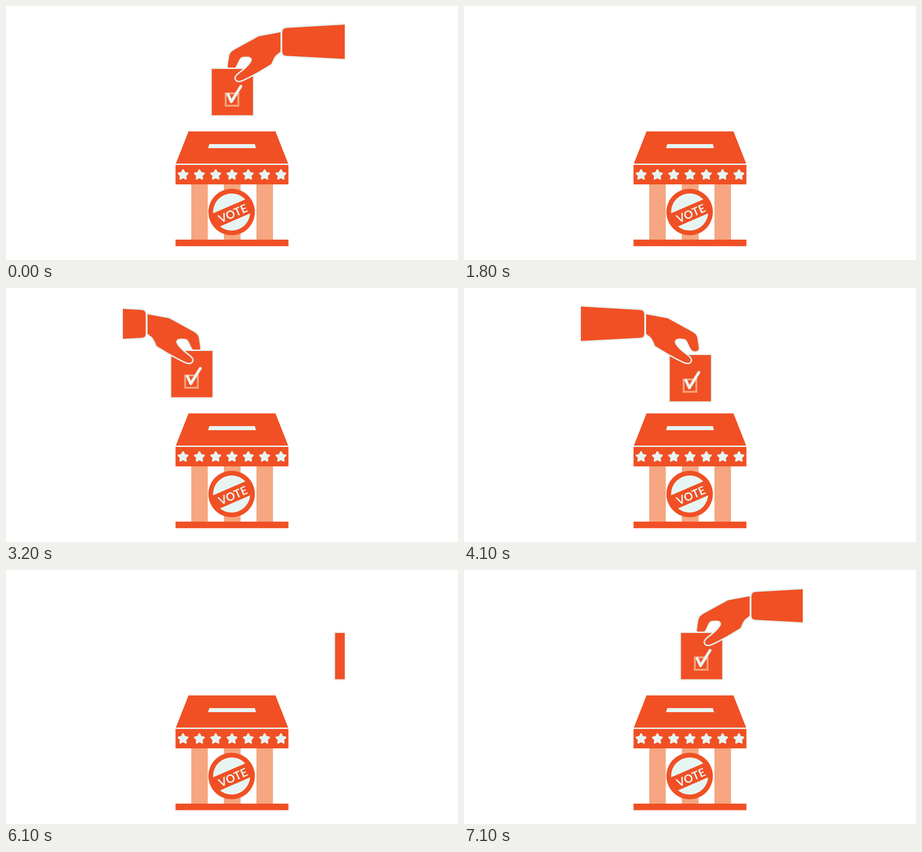
Recreate the animation shown at these times as an HTML page. Size 998 px wide and 561 px high, loop 7.2 s.

```html
<!DOCTYPE html>
<html lang="en">
<head>
<meta charset="utf-8">
<title>Ballot box</title>
<style>
  :root { --red: #f15025; --mint: #e7f5f2; --peach: #f6a680; }
  html, body { margin: 0; width: 100%; height: 100%; overflow: hidden; background: #fff; }
  svg { display: block; width: 100%; height: 100%; }

  .red { fill: var(--red); }
  .mint { fill: var(--mint); }
  .peach { fill: var(--peach); }
  .edged { stroke: #dd8c68; stroke-width: .6; }
  .outlined { fill: var(--red); stroke: var(--mint); stroke-width: 6; paint-order: stroke; }
  .round { stroke-linejoin: round; }
  .vote { font: 700 25px Lato, sans-serif; letter-spacing: .4px; text-anchor: middle; }

  /* Everything moves at ten steps a second; the tiny delay keeps steps on their marks. */
  .right, .left, .ballot { animation: 7.2s -1ms infinite step-end; }
  .right { animation-name: right; }
  .left { animation-name: left; }
  .ballot { animation-name: ballot; }

  @keyframes right {
    0% { transform: translateX(0); }
    6.9444% { transform: translateX(0); animation-timing-function: steps(13); }
    25% { transform: translateX(283.4px); }
    83.3333% { transform: translateX(297px); animation-timing-function: steps(12); }
    100% { transform: translateX(0); }
  }
  @keyframes left {
    0% { transform: translateX(-291px); }
    31.9444% { transform: translateX(-291px); animation-timing-function: steps(13); }
    50% { transform: translateX(0); }
    56.9444% { transform: translateX(0); animation-timing-function: steps(13); }
    75%, 100% { transform: translateX(-283.4px); }
  }
  @keyframes ballot {
    0% { transform: translate(0, 0); }
    6.9444% { transform: translate(0, 9px); animation-timing-function: steps(8); }
    18.0556% { transform: translate(0, 171px); }
    31.9444% { transform: translate(-291px, 0); animation-timing-function: steps(13); }
    50% { transform: translate(0, 0); }
    56.9444% { transform: translate(0, 9px); animation-timing-function: steps(8); }
    68.0556% { transform: translate(0, 171px); }
    83.3333% { transform: translate(297px, 0); animation-timing-function: steps(12); }
    100% { transform: translate(0, 0); }
  }
</style>
</head>
<body>
<svg viewBox="0 0 998 561">
  <defs>
    <clipPath id="window"><rect x="258.5" width="489" height="306"/></clipPath>
    <clipPath id="thumb"><path d="M150 0H400L456 104L485 132L525 162V190H150Z"/></clipPath>
    <clipPath id="disc"><circle r="41"/></clipPath>

    <g id="hand" class="outlined round">
      <path d="M402 58L450 67L501 95Q513 101 515 109L518 129Q520 140 510 140Q505 140 502 136
        C496 128 495 118 488 113Q480 111 472 112Q462 115 467 124C473 134 485 143 494 150
        Q503 157 500 162Q497 168 485 163Q468 155 452 146L422 128Q416 112 411 108L402 101Z"/>
      <path d="M198 37.4L389 48.5Q398 49 398 58V101Q398 109.500 389 110L198 120.200Z"/>
    </g>
    <g id="front" clip-path="url(#thumb)"><use href="#hand"/></g>

    <path id="star" class="mint round" stroke="#e7f5f2" stroke-width="4"
      d="M0-10.500L3.100-4.300L10-3.200L5 1.600L6.200 8.500L0 5.200L-6.200 8.500L-5 1.600L-10-3.200L-3.100-4.300Z"/>
  </defs>

  <!-- Ballot box -->
  <path class="red" d="M403 277H595L623 348H375Z"/>
  <path class="mint" d="M449 305H549.500L552 314H446Z"/>
  <rect class="peach" x="409" y="393" width="36.500" height="124"/>
  <rect class="peach edged" x="481.300" y="393" width="36.200" height="124"/>
  <rect class="peach edged" x="553.300" y="393" width="35.700" height="124"/>
  <rect class="mint" x="375" y="348" width="248" height="3"/>
  <rect class="red" x="374.300" y="351" width="249.300" height="43"/>
  <rect class="red" x="374.300" y="516" width="249.300" height="14.500"/>
  <g transform="translate(391 373)">
    <use href="#star"/>
    <use href="#star" x="36"/>
    <use href="#star" x="72"/>
    <use href="#star" x="108"/>
    <use href="#star" x="144"/>
    <use href="#star" x="180"/>
    <use href="#star" x="216"/>
  </g>

  <g transform="translate(498.200 455) rotate(-23.500)">
    <circle class="red" r="51.300"/>
    <circle class="mint" r="41"/>
    <rect class="red" x="-46" y="-13.600" width="92" height="32.600"/>
    <text class="vote mint" x="1.500" y="13">VOTE</text>
  </g>

  <!-- Fingers behind the ballot, thumb in front -->
  <g clip-path="url(#window)">
    <g class="right"><use href="#hand" transform="translate(1008) scale(-1 1)"/></g>
    <g class="left"><use href="#hand"/></g>
    <g class="ballot">
      <rect class="outlined" x="454.300" y="139" width="91" height="102.300"/>
      <rect x="485" y="193" width="28" height="27.300" fill="none" stroke="#f6a680" stroke-width="4"/>
      <path d="M490 195L497.500 211.500L518.500 177.500" fill="none" stroke="#e7f5f2" stroke-width="6.200"
        stroke-linecap="round" stroke-linejoin="round"/>
    </g>
    <g class="right"><use href="#front" transform="translate(1008) scale(-1 1)"/></g>
    <g class="left"><use href="#front"/></g>
  </g>
</svg>
</body>
</html>
```
